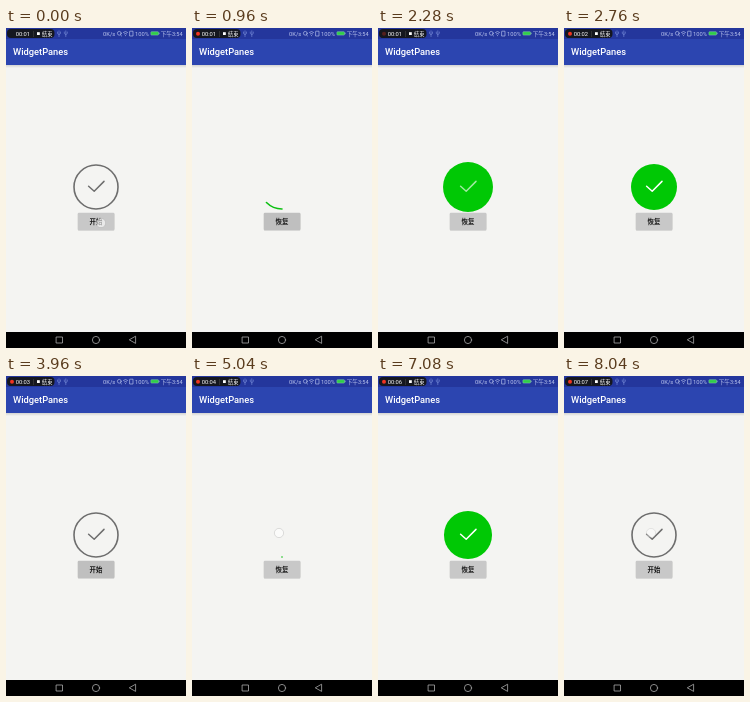
An HTML page for the animation above (8.16 s loop, 180 px wide and 320 px high).

```html
<!DOCTYPE html>
<html lang="zh">
<head>
<meta charset="utf-8">
<title>Tick view</title>
<style>
  html, body { margin: 0; width: 100%; height: 100%; overflow: hidden; background: #f4f4f2; }
  svg { display: block; width: 100%; height: 100%; }
  text { font-family: Roboto, "Noto Sans CJK SC", "Noto Sans CJK", sans-serif; fill: #fff; }
  .small { font-size: 5.8px; }
  .bar { fill: #bcc6ee; }
  .line { fill: none; stroke-linecap: round; stroke-linejoin: round; }
</style>
</head>
<body>
<svg viewBox="0 0 180 320">
  <defs>
    <linearGradient id="shade" x2="0" y2="1">
      <stop stop-color="#000" stop-opacity=".14"/>
      <stop offset="1" stop-color="#000" stop-opacity="0"/>
    </linearGradient>
  </defs>
  <rect width="180" height="320" fill="#f4f4f2"/>
  <rect y="37" width="180" height="3" fill="url(#shade)"/>
  <rect width="180" height="37" fill="#2c45b0"/>
  <rect width="180" height="11" fill="#24369c"/>
  <text x="7" y="27" font-size="9.3" font-weight="500">WidgetPanes</text>

  <!-- status bar -->
  <rect x="1" y="1" width="47.5" height="9" rx="4" fill="#15171f"/>
  <circle id="dot" cx="6" cy="5.7" r="2" fill="#f03420"/>
  <text id="timer" class="small" x="9.7" y="7.8"></text>
  <path d="M27.5 3v6" stroke="#444" stroke-width=".6"/>
  <rect x="31" y="4.2" width="2.8" height="2.8" fill="#fff"/>
  <text x="36" y="7.7" font-size="5.2">结束</text>
  <g class="line" stroke="#7c92dc" stroke-width=".6">
    <path id="usb" d="M53 2.8v5.8M51.5 4v1.5l1.5 1.2l1.5-1.2v-1.5"/>
    <use href="#usb" x="6.8"/>
  </g>
  <text class="small bar" x="97" y="7.8">0K/s</text>
  <g class="line" stroke="#bcc6ee" stroke-width=".65">
    <circle cx="113.3" cy="5.3" r="1.9"/>
    <path d="M114.4 6.8l1.2 1.2"/>
    <path d="M117.4 4.4q2.1-2 4.2 0M118.3 5.9q1.2-1 2.4 0M119.5 7.5v.2"/>
    <path d="M124.2 3.2h2.8v4.8h-3.4v-4.1z"/>
  </g>
  <text class="small bar" x="129" y="7.8">100%</text>
  <rect x="144.9" y="3.7" width="7.6" height="3.4" rx=".7" fill="#2fce48" stroke="#8cc8b0" stroke-width=".5"/>
  <rect x="152.8" y="4.7" width=".7" height="1.4" fill="#8cc8b0"/>
  <text class="bar" x="154.7" y="7.8" font-size="5.6">下午3:54</text>

  <!-- button -->
  <rect x="71.8" y="185.4" width="36.6" height="17.4" rx="1" fill="#000" opacity=".16"/>
  <rect id="button" x="71.8" y="184.8" width="36.6" height="17.2" rx="1"/>
  <text id="label" x="90" y="195.5" font-size="6.4" font-weight="700" text-anchor="middle" style="fill:#151515"></text>

  <!-- tick view -->
  <g class="line">
    <circle id="disc" cx="90" cy="159" style="fill:#00c805"/>
    <circle id="hole" cx="90" cy="159" style="fill:#f4f4f2"/>
    <circle id="ring" cx="90" cy="159" r="22" pathLength="360" stroke-width="1.6" transform="rotate(90 90 159)"/>
    <path id="tick" d="M82.6 158.3l5.6 4.9l9.8-9.8" stroke-width="1.5"/>
  </g>
  <circle id="touch" r="4.6" fill="#fff" fill-opacity=".6" stroke="#999" stroke-opacity=".5" stroke-width=".6"/>

  <!-- navigation bar -->
  <rect y="304" width="180" height="16" fill="#000"/>
  <g class="line" stroke="#aaa" stroke-width=".8">
    <rect x="50.5" y="309" width="6" height="6"/>
    <circle cx="90" cy="312" r="3.6"/>
    <path d="M129.6 308.6v6.8l-6-3.4z"/>
  </g>
</svg>
<script>
const LOOP = 8160, STEP = 120;
const $ = id => document.getElementById(id);
const set = (id, attrs) => {
  for (const key in attrs) $(id).setAttribute(key, attrs[key]);
};

const holds = [[0, 480], [480, 840], [4200, 4440], [4800, 5040],
               [5040, 5400], [5400, 5640], [7440, 7920]];

// [time, phase]: 0-1 ring, 1-2 fill, 2-3 bounce
const runs = [
  { end: 3360, keys: [[840, 0], [1680, .875], [1800, 1], [2160, 2], [2640, 3]] },
  { end: 7320, keys: [[5040, 0], [5400, .49], [6120, .93], [6240, 1], [6600, 2], [7150, 3]] }
];

// [start, end, x, y]
const touches = [[0, 840, 95, 195], [2880, 3600, 92, 192],
                 [4560, 5400, 87, 157], [7200, 8280, 87, 157]];

const clamp = v => Math.max(0, Math.min(1, v));

function snap(t) {
  const hold = holds.find(([a, b]) => t >= a && t < b);
  return hold ? hold[0] : Math.floor(t / STEP) * STEP;
}

function phaseAt(keys, t) {
  const i = keys.findIndex(k => k[0] > t);
  if (i < 0) return 3;
  const [t0, p0] = keys[i - 1], [t1, p1] = keys[i];
  return p0 + (p1 - p0) * (t - t0) / (t1 - t0);
}

function drawTick(run, t) {
  const phase = run ? phaseAt(run.keys, t) : 0;
  const filled = phase >= 1;
  const bounce = clamp(phase - 2);
  set("disc", { r: filled ? 23 + 4 * (1 - Math.abs(2 * bounce - 1)) : 0 });
  set("hole", { r: filled ? 21 * clamp(2 - phase) : 0 });
  set("ring", {
    stroke: run ? "#0cc012" : "#6e6e6e",
    "stroke-dasharray": run ? `${phase * 360} 720` : "none",
    opacity: filled ? 0 : 1
  });
  set("tick", { stroke: run ? "#fff" : "#6e6e6e", opacity: run ? clamp(bounce * 2.5) : 1 });
}

function draw(t) {
  const run = runs.find(r => t >= r.keys[0][0] && t < r.end);
  drawTick(run, t);
  $("label").textContent = run ? "恢复" : "开始";

  const pressed = t >= 480 && t < 1560 || t >= 3000 && t < 4200;
  set("button", { fill: pressed ? "#bfbfbf" : "#c8c8c8" });

  const touch = touches.find(([a, b]) => t >= a && t < b);
  set("touch", touch
    ? { cx: touch[2], cy: touch[3], opacity: clamp((touch[1] - t) / 360) }
    : { opacity: 0 });

  const clock = t - 600;
  $("timer").textContent = "00:0" + Math.max(1, Math.floor(clock / 1000));
  set("dot", { opacity: t < 840 ? 0 : clock % 1000 < 600 ? 1 : .3 });
}

const start = performance.now();
function tick(now) {
  draw(snap(Math.max(0, now - start) % LOOP));
  requestAnimationFrame(tick);
}
draw(0);
requestAnimationFrame(tick);
</script>
</body>
</html>
```
